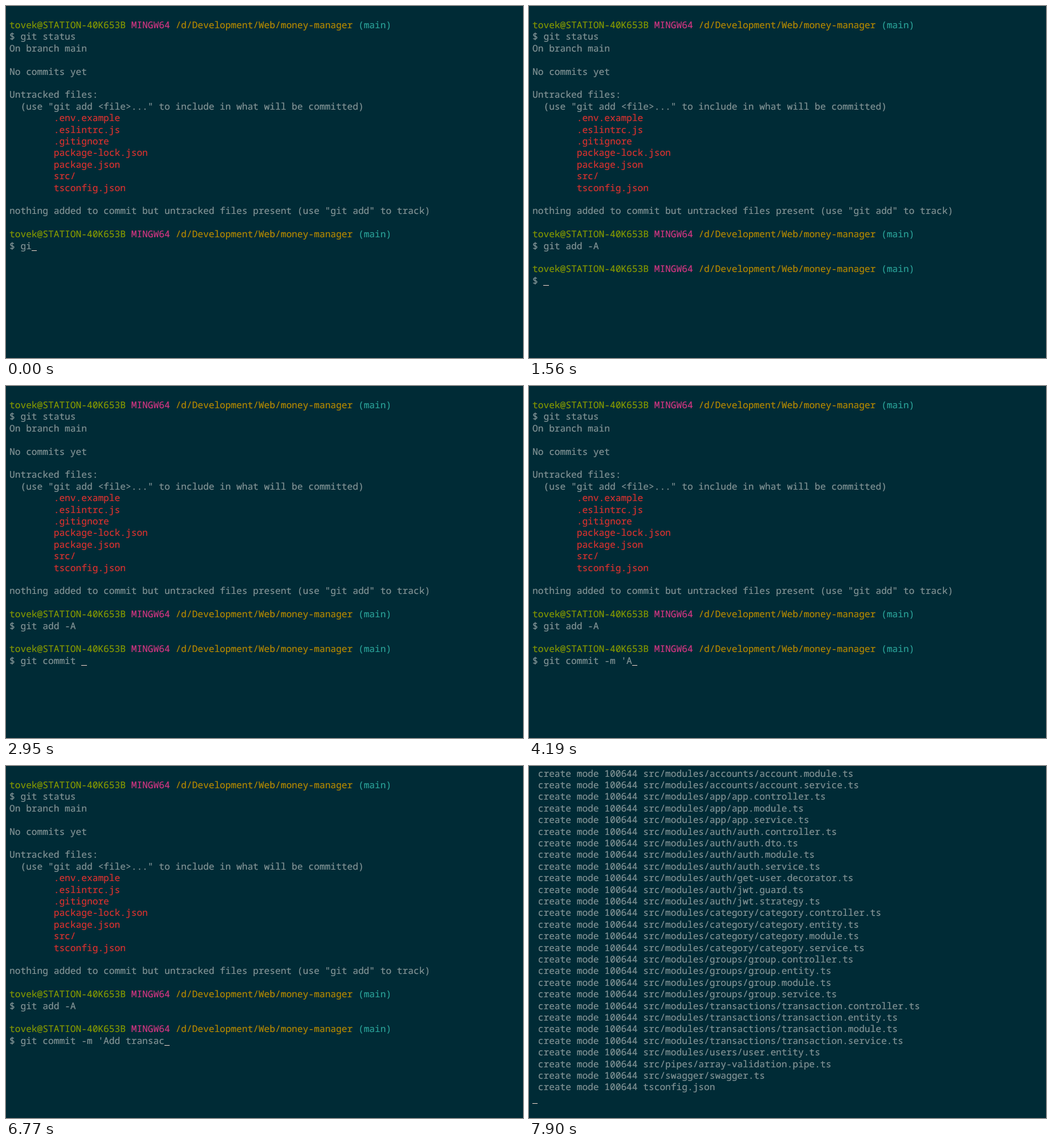
An HTML page for the animation above (8000 ms loop, 907x618 px).

```html
<!DOCTYPE html>
<html lang="en">
<head>
<meta charset="utf-8">
<title>Terminal</title>
<style>
  html, body { margin: 0; width: 100%; height: 100%; overflow: hidden; background: #002b36; }
  #screen {
    position: absolute; left: 6px; top: 3px; margin: 0; color: #839496;
    font: 16.19px/20px "Noto Sans Mono", "DejaVu Sans Mono", monospace;
    font-variant-ligatures: none; text-rendering: geometricPrecision;
    -webkit-text-stroke: 0.2px;
  }
  #screen div { position: absolute; left: 0; }
  #cursor { position: absolute; height: 1px; background: #f8d8cc; }
  .user { color: #859900; }
  .system { color: #d33682; }
  .path { color: #b58900; }
  .branch { color: #2aa198; }
  .file { color: #dc322f; }
</style>
</head>
<body>
<pre id="screen"></pre>
<div id="cursor"></div>
<script>
const LOOP = 8000;
const screenEl = document.getElementById("screen");
const cursorEl = document.getElementById("cursor");

// Pixel edges of the character grid
const columnX = column => Math.round(5.7 + column * 9.715);
const rowY = row => Math.floor(row * 102 / 5);

const promptParts = [
  ["user", "tovek@STATION-40K653B"],
  ["system", "MINGW64"],
  ["path", "/d/Development/Web/money-manager"],
  ["branch", "(main)"],
];
const prompt = promptParts.map(p => p[1]).join(" ");
const span = (name, text) => `<span class="${name}">${text}</span>`;
const promptHtml = promptParts.map(p => span(...p)).join(" ");

const status = `
${prompt}
$ git status
On branch main

No commits yet

Untracked files:
  (use "git add <file>..." to include in what will be committed)
        .env.example
        .eslintrc.js
        .gitignore
        package-lock.json
        package.json
        src/
        tsconfig.json

nothing added to commit but untracked files present (use "git add" to track)

${prompt}
$ `;

const moduleFiles = (base, kinds) => kinds.split(" ").map(kind => `src/modules/${base}.${kind}.ts`);
const crud = "controller entity module service";
const listing = [
  ...moduleFiles("accounts/account", "module service"),
  ...moduleFiles("app/app", "controller module service"),
  ...moduleFiles("auth/auth", "controller dto module service"),
  ...moduleFiles("auth/get-user", "decorator"),
  ...moduleFiles("auth/jwt", "guard strategy"),
  ...moduleFiles("category/category", crud),
  ...moduleFiles("groups/group", crud),
  ...moduleFiles("transactions/transaction", crud),
  ...moduleFiles("users/user", "entity"),
  "src/pipes/array-validation.pipe.ts",
  "src/swagger/swagger.ts",
  "tsconfig.json",
].map(path => ` create mode 100644 ${path}\n`).join("");

// Each entry: time in ms, text added to the screen
const typed = [
  [0, "gi"], [130, "t"], [270, " "], [400, "a"], [540, "dd"], [680, " "], [820, "-"],
  [1120, "A"], [1270, "\n"], [1560, `\n${prompt}\n$ `],
  [1820, "g"], [1960, "i"], [2100, "t"], [2240, " "], [2390, "c"], [2530, "om"],
  [2680, "m"], [2820, "i"], [2950, "t "], [3080, "-"], [3220, "m"], [3360, " '"],
  [4190, "A"], [4480, "d"], [4630, "d "],
  [6170, "t"], [6320, "ra"], [6470, "n"], [6620, "sa"], [6770, "c"],
  [6930, "t"], [7050, "io"], [7180, "ns"], [7330, "'"], [7600, "\n"],
];

function textAt(time) {
  if (time >= 7900) return listing;
  return status + typed.filter(([start]) => start <= time).map(entry => entry[1]).join("");
}

function lineHtml(line, row) {
  const html = line
    .replace(/</g, "&lt;").replace(/>/g, "&gt;")
    .replace(prompt, promptHtml)
    .replace(/^ {8}.+$/, name => span("file", name));
  return `<div style="top:${rowY(row)}px">${html}</div>`;
}

function placeCursor(lines) {
  const row = lines.length - 1;
  const column = lines[row].length;
  const x = columnX(column);
  cursorEl.style.left = x + "px";
  cursorEl.style.width = columnX(column + 1) - x + "px";
  cursorEl.style.top = rowY(row) + 21 + "px";
}

let shown;
function draw(now) {
  const time = now % LOOP;
  const text = textAt(time);
  if (text !== shown) {
    const lines = text.split("\n");
    screenEl.innerHTML = lines.map(lineHtml).join("");
    placeCursor(lines);
    shown = text;
  }
  cursorEl.hidden = time >= 5320 && time < 5880;
  requestAnimationFrame(() => draw(performance.now() - begin));
}
const begin = performance.now();
draw(0);
</script>
</body>
</html>
```
